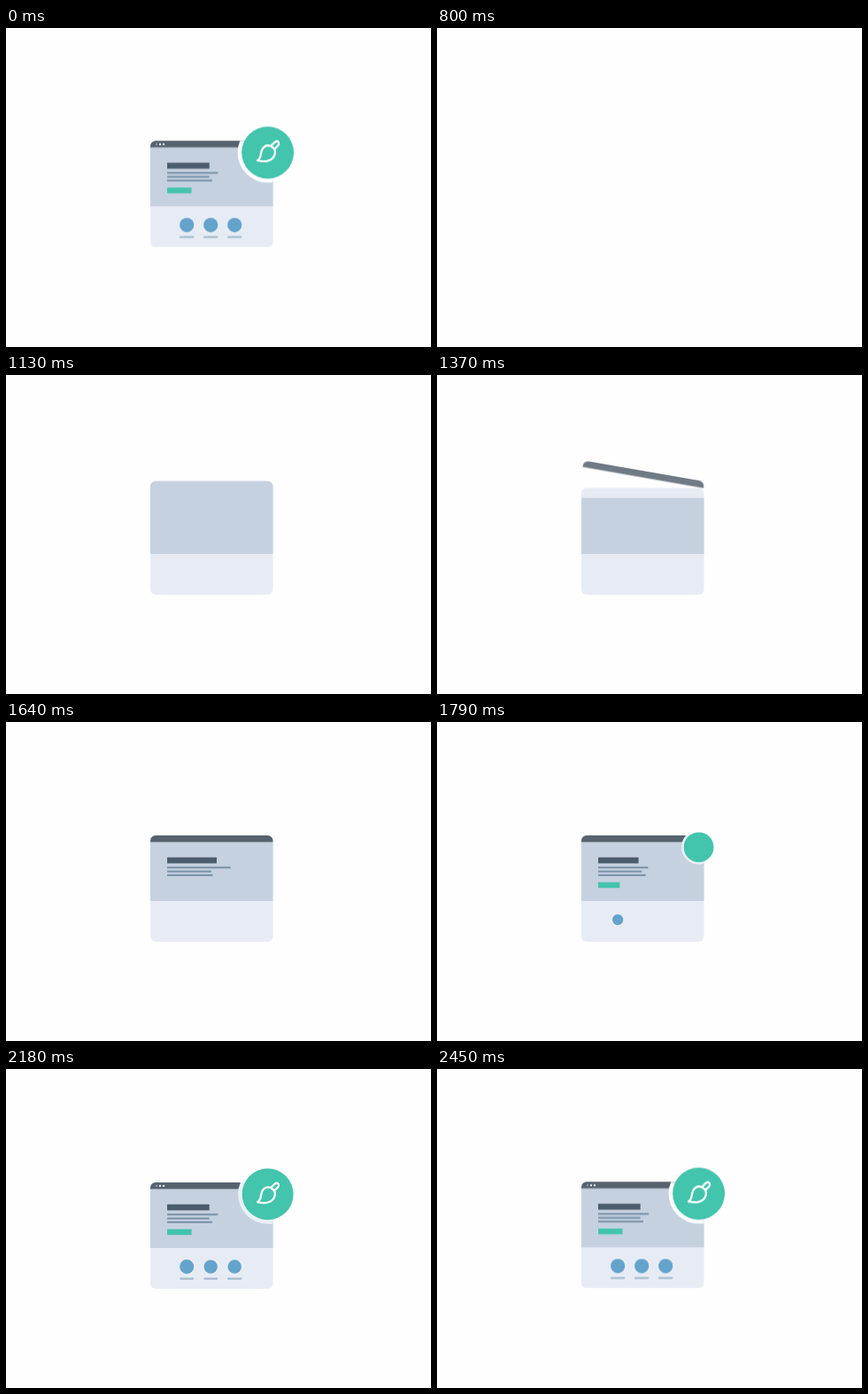
An HTML page without scripts that plays this animation: 480 px wide and 360 px high, repeating every 3020 ms.

```html
<!DOCTYPE html>
<html lang="en">
<head>
<meta charset="utf-8">
<title>Web design card</title>
<style>
  /* --rest is 1 while the finished picture holds; --p is each part's own springy progress */
  @property --rest { syntax: "<number>"; inherits: true; initial-value: 1; }
  @property --p { syntax: "<number>"; inherits: false; initial-value: 0; }

  html, body { margin: 0; width: 100%; height: 100%; overflow: hidden; background: #fefefe; }
  svg { display: block; width: 100vw; height: 100vh; animation: rest 3020ms step-end infinite; }
  .scene { transform: translateY(calc(var(--rest) * -.7px)); }

  /* --s: start in ms, --k: overshoot damping */
  .pop, .wide, .tall {
    --v: max(var(--rest), min(var(--p), 1 + (var(--p) - 1) * var(--k, 1)));
    transform-box: fill-box;
    transform-origin: center;
    animation: spring 3020ms linear calc(var(--s) * 1ms - 3020ms) infinite;
  }
  .pop { transform: scale(var(--v)); }
  .wide { transform: scaleX(var(--v)); }
  .tall { transform: scaleY(var(--v)); transform-origin: bottom; }
  .left { transform-origin: left; }
  .badge { --s: 1745; --k: .5; }

  .lid { transform-origin: 301px 132px; animation: drop 3020ms linear infinite; }
  .ring { fill: #eaf1f8; animation: ring 3020ms step-end infinite; }

  .copy { fill: #7b93a9; }
  .discs { fill: #64a3cb; }
  .captions { fill: #a2b9cc; }
  .teal { fill: #43c4ac; }
  .icon { fill: none; stroke: #fff; stroke-width: 2.3; stroke-linejoin: round; stroke-linecap: round; }

  @keyframes rest {
    0% { --rest: 1; }
    26.49% { --rest: 0; }
    81.12%, 100% { --rest: 1; }
  }
  @keyframes spring {
    0% { --p: 0; }
    2.65% { --p: 1; animation-timing-function: ease-out; }
    4.3% { --p: 1.25; animation-timing-function: cubic-bezier(.4, 0, .8, .6); }
    8% { --p: 1.01; animation-timing-function: ease-out; }
    12.4% { --p: .95; animation-timing-function: ease-in-out; }
    16% { --p: 1.008; }
    18%, 57.99% { --p: 1; }
    58%, 100% { --p: 0; }
  }
  @keyframes drop {
    0%, 26.48% { opacity: 1; transform: none; }
    26.49%, 41.3% { opacity: 0; transform: translateY(-14px) rotate(16deg); }
    43.38% { opacity: .5; transform: translateY(-13px) rotate(14deg); }
    45.37% { opacity: .85; transform: translateY(-8px) rotate(10deg); }
    48.3%, 100% { opacity: 1; transform: none; }
  }
  @keyframes ring {
    0% { fill: #fbfcfd; }
    26.49% { fill: #eaf1f8; }
    81.12%, 100% { fill: #fbfcfd; }
  }
</style>
</head>
<body>
<svg viewBox="0 0 480 360">
  <clipPath id="card">
    <rect class="tall" style="--s:905" x="163" y="128" width="138.5" height="120" rx="6"/>
  </clipPath>
  <g class="scene">
    <g clip-path="url(#card)">
      <rect x="163" y="60" width="139" height="190" fill="#e7ecf4"/>
      <rect class="tall" style="--s:980" x="163" y="135.5" width="139" height="66.5" fill="#c6d1df"/>
    </g>

    <path class="lid" d="M163 135.5V134a6 6 0 0 1 6-6h126.5a6 6 0 0 1 6 6v1.5z" fill="#56636f"/>
    <g fill="#eef2f6">
      <circle class="pop" style="--s:1860" cx="170" cy="131.9" r="1.1" opacity=".45"/>
      <circle class="pop" style="--s:1870" cx="174" cy="131.9" r="1.2"/>
      <circle class="pop" style="--s:1880" cx="178" cy="131.9" r="1.2"/>
    </g>

    <rect class="wide left" style="--s:1450" x="182" y="152.8" width="47.7" height="6.6" rx=".5" fill="#4b5c6c"/>
    <g class="copy">
      <rect class="wide left" style="--s:1510" x="182" y="163.2" width="57.3" height="2.1"/>
      <rect class="wide left" style="--s:1555" x="182" y="167.6" width="47.7" height="2.1"/>
      <rect class="wide left" style="--s:1560" x="182" y="171.8" width="51" height="2.1"/>
    </g>
    <rect class="wide left teal" style="--s:1720" x="182" y="180.7" width="27.5" height="6.5" rx=".5"/>

    <g class="discs">
      <circle class="pop" style="--s:1730" cx="204.2" cy="223.1" r="8.1"/>
      <circle class="pop" style="--s:1795" cx="231.2" cy="223.1" r="8.1"/>
      <circle class="pop" style="--s:1840" cx="258.2" cy="223.1" r="8.1"/>
    </g>
    <g class="captions">
      <rect class="wide" style="--s:1840" x="196.2" y="235.6" width="16" height="2.1"/>
      <rect class="wide" style="--s:1880" x="223.2" y="235.6" width="16" height="2.1"/>
      <rect class="wide" style="--s:1940" x="250.2" y="235.6" width="16" height="2.1"/>
    </g>

    <g clip-path="url(#card)">
      <g class="pop badge"><circle class="ring" cx="295.6" cy="141.3" r="34"/></g>
    </g>
    <circle class="pop badge teal" cx="295.6" cy="141.3" r="29.4"/>
    <g class="pop icon" style="--s:1910">
      <path d="M284 150.2C290 146.5 286 140 291 135.3C297 130.2 306 136.5 303.5 143.7C301 151.5 292 152.2 284 150.2Z"/>
      <path d="M299.3 133.6L303.8 129.4Q306.4 127.6 307.8 129.6Q308.8 131.6 307 133.6L303.3 137.2"/>
    </g>
  </g>
</svg>
</body>
</html>
```
